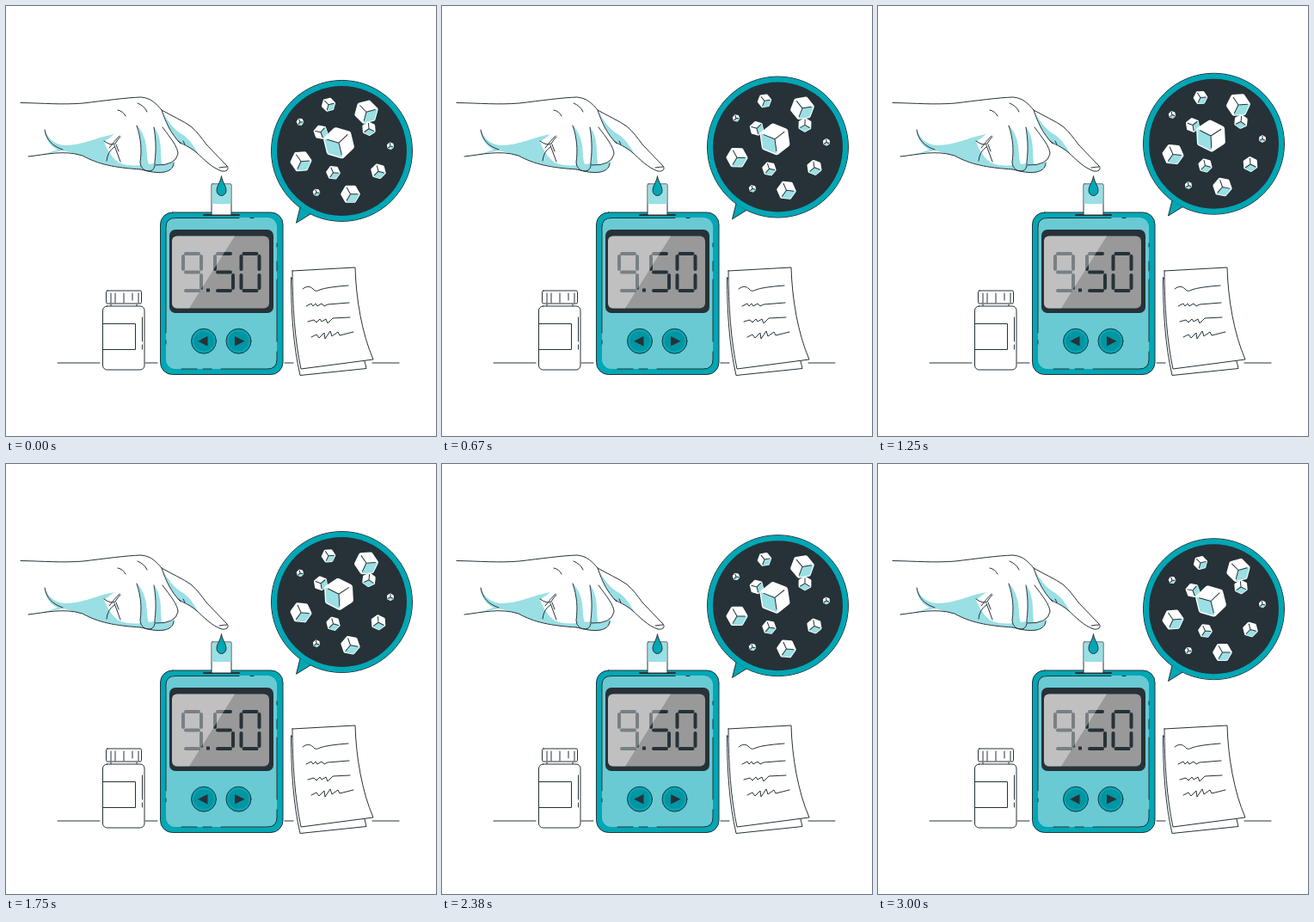
Animation of 500x500 px, one loop 3040 ms. Source, as an HTML page:

```html
<!DOCTYPE html>
<html lang="en">
<head>
<meta charset="utf-8">
<title>Glucose meter</title>
<style>
  html, body { margin: 0; width: 100%; height: 100%; overflow: hidden; background: #fff; }
  svg { display: block; width: 100vw; height: 100vh; }
  .teal { fill: #00a7b5; }
  .light { fill: #69cad4; }
  .shade { fill: #99dfe4; }
  .dark { fill: #263238; }
  .paper { fill: #fff; }
  .line { stroke: #263238; stroke-width: 1; stroke-linecap: round; stroke-linejoin: round; }
  .open { fill: none; }
</style>
</head>
<body>
<svg viewBox="0 0 500 500">
  <path class="line open" d="M60 415H109M162 415H176M324 415H334M426 415H457"/>

  <!-- hand -->
  <path class="shade" d="M45 144C49 155 58 162 70 162C88 162 108 152 126 149L114 158C118 168 123 176 131 182C140 186 149 186 157 185L157 190C126 187 107 184 89 174L66 168L38 174Q52 170 60 167C50 162 46 154 45 144Z"/>
  <path class="shade" d="M152 139C157 143 161 151 163 162C164 172 164 180 166 184L173 183L176 185Q190 186 196 180C196 191 186 194 176 194L166 192Q157 192 156 184C158 168 157 153 152 139Z"/>
  <path class="shade" d="M172 141C178 147 180 159 180 170L181 185H173C175 170 174 154 172 141Z"/>
  <path class="shade" d="M181 121C187 133 195 144 206 150C213 155 219 163 224 173C216 166 207 160 200 157C191 146 186 134 181 121Z"/>
  <path class="line open" d="M17 112.500C45 113 65 115 90 113C115 110 140 106.500 157 106C169 107 175 114 181 121C193 128 205 133 215 140C223 147 227 153 233 161L257 186C260 190 256 193 251 192C239 188 230 178 221 170C213 163 205 161 200 157M26 175C45 173 67 167 89 174C107 184 126 188 157 190M45 144C47 156 54 163 66 167M181 121C186 136 192 149 203 160M152 139C157 154 158 167 156 182Q157 192 167 192Q174 191 173 181C175 166 174 153 172 141M182 141C191 153 200 164 200 172Q197 186 174 185M157 190C177 196 194 195 195 183M130 121Q136 122 139 128M153 113Q161 116 164 123M114 157Q122 163 127 160Q130 155 133 152M120 165Q126 157 132 151M117 180Q118 169 126 164M126 162L133 181M128 161L131 169M206 157L208 161M248 188Q254 187 257 187"/>

  <!-- bottle -->
  <rect class="line paper" x="116.500" y="331" width="41" height="15" rx="1.500"/>
  <path class="line open" d="M122 334V345M127 334V345M137 334V345M147 334V342M154 334V345M122 347V349M152 347V349"/>
  <rect class="line paper" x="112.500" y="349" width="48.500" height="74" rx="5"/>
  <path class="line open" d="M113 369.500H150.500V399.500H113M158.500 362V390M158.500 394V399"/>

  <!-- notes -->
  <path class="line paper" d="M331.500 316C331.500 355 334 395 342 429.500L419 421.500L417 413Z"/>
  <path class="line paper" d="M333 308L406 304C407 341 414 381 427 411L343 422C336 390 333 347 333 308Z"/>
  <path class="line open" d="M345 329C350 325 354 326 357 329Q360 333 365 330Q372 327 398 325M349 349L355 346L357 349L360 346L362 349L367 346L370 349L374 347L399 345M351 367L358 365L361 368L365 364L367 367L372 364L374 369L380 363L400 362M355 385L361 382L364 386L370 380L371 387L377 378L379 384L386 379L388 383L404 379"/>

  <!-- meter -->
  <rect class="line teal" x="179.500" y="240" width="142.500" height="188.500" rx="14"/>
  <rect class="light" x="186" y="246" width="129" height="176" rx="11"/>
  <path class="line open" d="M186 380V257Q186 246.500 197 246.500H271M284 246.500H288M315 276V280M315 297V308M315 318V390M186 389V393M229 422H239M204 422H222M250 422H304Q315 422 315 411V402"/>
  <rect class="dark" x="190" y="260" width="121" height="97" rx="7"/>
  <rect x="193" y="267.500" width="113" height="84" rx="6" fill="#999"/>
  <g id="digits" stroke="#263238" stroke-width="4" stroke-linecap="round" fill="none"></g>
  <rect class="dark" x="233" y="328.500" width="4" height="4"/>
  <path fill="#fff" opacity=".38" d="M199 267.500H266L213 351.500H199Q193 351.500 193 345.500V273.500Q193 267.500 199 267.500Z"/>
  <g class="line teal">
    <circle cx="230" cy="389.700" r="14.500"/>
    <circle cx="270.500" cy="389.700" r="14.500"/>
  </g>
  <g fill="#0095a2">
    <circle cx="230" cy="389.700" r="11.500"/>
    <circle cx="270.500" cy="389.700" r="11.500"/>
  </g>
  <path class="dark" d="M223 389.700L234.500 384V395.500ZM277.500 389.700L266 384V395.500Z"/>
  <path class="line open" style="stroke-width:2" d="M230 243H271"/>
  <rect class="line paper" x="239" y="207" width="23" height="36" rx="1"/>
  <rect class="shade" x="239.500" y="207.500" width="22" height="22.500"/>
  <path class="line teal" d="M250.500 198C249 206 245 209 245 214.500A5.500 6 0 0 0 256 214.500C256 209 252 206 250.500 198Z"/>

  <!-- bubble -->
  <g id="bubble">
    <circle class="line teal" cx="390.500" cy="168.700" r="82"/>
    <path class="line teal" d="M354 242.200L337.500 252.500L342 234.500"/>
    <circle class="teal" cx="390.500" cy="168.700" r="81.500"/>
    <circle class="dark" cx="390.500" cy="168.700" r="75.500"/>
    <g id="cubes"></g>
  </g>
</svg>
<script>
  const LOOP = 3040, RISE = 10, TURN = 13;
  const byId = id => document.getElementById(id);

  // Seven segments: top, upper left, upper right, middle, lower left, lower right, bottom
  const segments = ["M5 2H20", "M2 5V20", "M23 5V20", "M5 23.5H20", "M2 27V42", "M23 27V42", "M5 45H20"];
  const numerals = [[204, "0123_56"], [241, "01356"], [271.5, "012456"]];
  byId("digits").innerHTML = numerals.map(([x, on]) =>
    `<path transform="translate(${x} 286)" d="${segments.filter((s, i) => on.includes(i)).join("")}"/>`).join("");

  // x, y, radius, direction where the shaded face begins
  const cubes = [
    [375, 115, 8.3, -15], [422, 143, 8.3, 25], [419, 123.5, 14, -15],
    [342, 135, 4.3, 5], [366, 147, 8.5, -50], [387, 159.5, 18.5, 76],
    [447, 163, 4.3, 20], [343, 181, 12.5, -5], [380.5, 194, 8.3, 5],
    [433, 192.5, 9, 15], [361, 217, 4.3, 10], [400.5, 219, 11.3, 0]
  ];

  const corner = (r, deg) => {
    const a = deg * Math.PI / 180;
    return `${(r * Math.cos(a)).toFixed(2)} ${(r * Math.sin(a)).toFixed(2)}`;
  };

  // White hexagon with rounded corners, one shaded face, three inner edges
  byId("cubes").innerHTML = cubes.map(([x, y, r, a]) => {
    const ring = size => [0, 1, 2, 3, 4, 5].map(k => corner(size * r, a + 60 * k));
    const hex = ring(0.82), face = ring(0.94), tips = ring(0.75);
    return `<g data-at="${x} ${y}">
      <path class="paper" d="M${hex.join("L")}Z" stroke="#fff" stroke-width="${r * 0.36}" stroke-linejoin="round"/>
      <path class="shade" d="M0 0L${face.slice(0, 3).join("L")}Z"/>
      <path class="line open" d="M0 0L${tips[0]}M0 0L${tips[2]}M0 0L${tips[4]}"/></g>`;
  }).join("");

  const bubble = byId("bubble"), cubeNodes = [...byId("cubes").children];
  const start = performance.now();

  function draw(now) {
    const phase = (Math.max(0, now - start) + 40) % LOOP / LOOP;
    const lift = 1 - Math.abs(1 - 2 * phase);
    bubble.setAttribute("transform", `translate(0 ${-RISE * lift})`);
    for (const node of cubeNodes)
      node.setAttribute("transform", `translate(${node.dataset.at}) rotate(${TURN * lift})`);
    requestAnimationFrame(draw);
  }
  draw(start);
</script>
</body>
</html>
```
